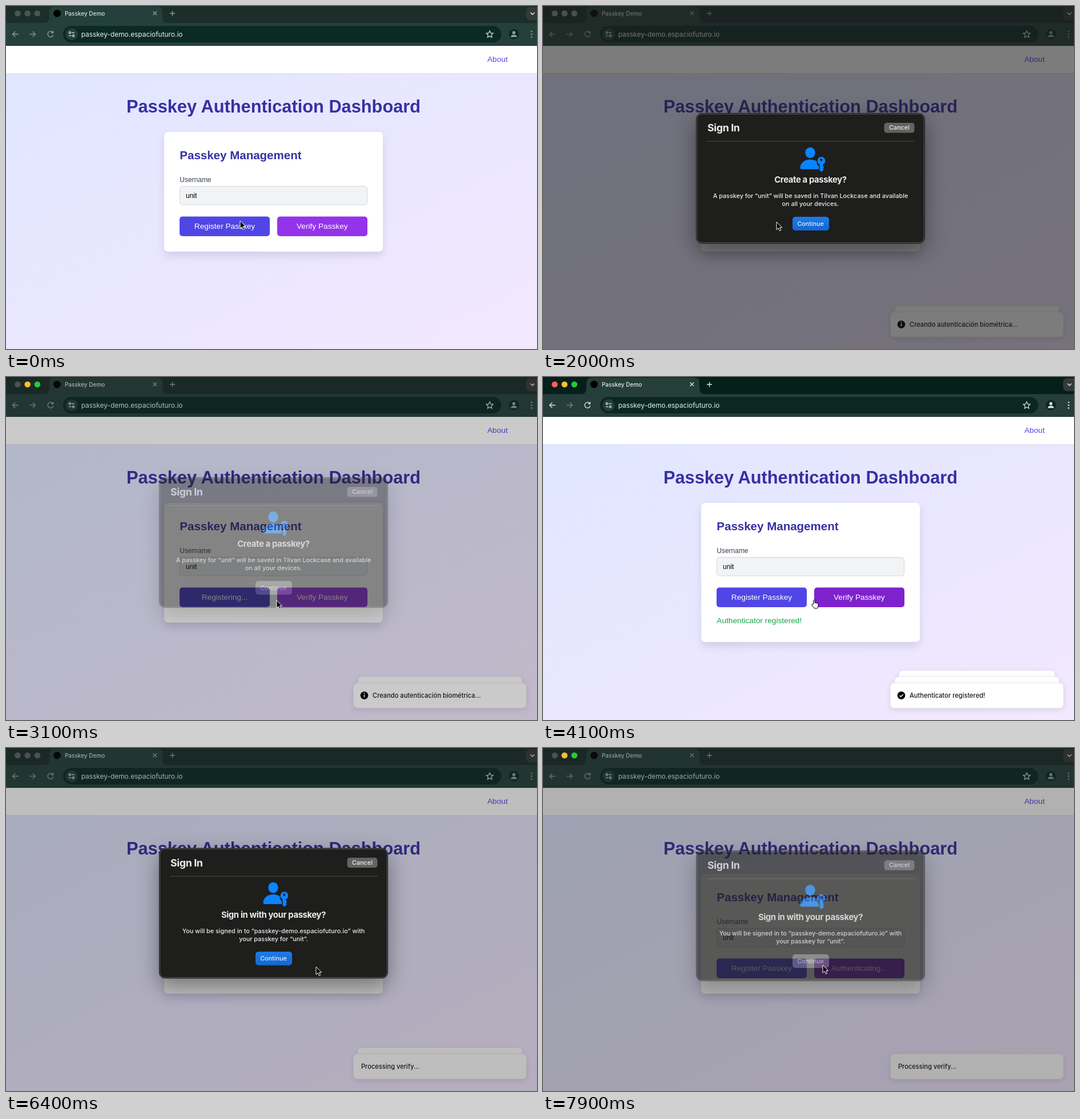
Write an HTML page that moves like this. It is 930 by 602 pixels and loops after 8000 ms.

```html
<!DOCTYPE html>
<html lang="en">
<head>
<meta charset="utf-8">
<title>Passkey Demo</title>
<style>
html, body { margin: 0; width: 100%; height: 100%; overflow: hidden; background: #fff; }
svg {
  display: block; width: 930px; height: 602px;
  font-family: "Liberation Sans", Arial, sans-serif; font-size: 13.68px;
  --strip: #051f1a; --bar: #253e39; --field: #0b2722; --icon: #dde6e4; --weak: #718681; --tab: #e6eeec;
}
svg.idle { --strip: #1b2e2a; --bar: #25403a; --field: #0b2a24; --icon: #90a29d; --weak: #80938e; --tab: #d5dedb; }
.ui { font-family: Inter, "Open Sans", sans-serif; font-weight: 500; }
.small { font-size: 10.8px; }
.mid { text-anchor: middle; }
.line { fill: none; stroke: var(--icon); stroke-width: 1.3; }
.card { fill: #fff; filter: drop-shadow(0 8px 7px rgba(40, 30, 90, .12)); }
.toast { fill: #fff; stroke: #ebebf0; filter: drop-shadow(0 3px 5px rgba(0, 0, 0, .1)); }
#sheet { filter: drop-shadow(0 12px 18px rgba(0, 0, 0, .4)); }
#sheet text { fill: #ededed; }
#sheet .head { font-weight: 700; letter-spacing: -.35px; }
</style>
</head>
<body>
<svg id="stage" viewBox="0 0 930 602">
  <defs>
    <linearGradient id="page" x2="1" y2="1">
      <stop stop-color="#e0e6ff"/><stop offset="1" stop-color="#f3e8ff"/>
    </linearGradient>
    <linearGradient id="blue" x2="0" y2="1">
      <stop stop-color="#1d7ce8"/><stop offset="1" stop-color="#1467d0"/>
    </linearGradient>
  </defs>

  <!-- Browser frame -->
  <rect width="930" height="70" fill="var(--strip)"/>
  <path fill="var(--bar)" d="M0 30H66Q76 30 76 20V10Q76 1 86 1H264Q274 1 274 10V20Q274 30 284 30H930V70H0Z"/>
  <circle cx="89.500" cy="13" r="6.500"/>
  <text class="ui" x="103" y="16.500" font-size="10" fill="var(--tab)">Passkey Demo</text>
  <path class="line" d="M257.500 9.500l6.500 6.500m0-6.500l-6.500 6.500M291.500 8.500v9m-4.500-4.500h9"/>
  <rect x="911" y="2" width="26" height="23" rx="7" fill="#353a39"/>
  <path d="M918.500 11.500l3.500 3.500 3.500-3.500" fill="none" stroke="#e6e6e6" stroke-width="1.500"/>
  <path class="line" d="M21.500 49.500H11.500m4.700-4.700l-4.700 4.700 4.700 4.700"/>
  <path class="line" style="stroke:var(--weak)" d="M41.500 49.500h10m-4.700-4.700l4.700 4.700-4.700 4.700"/>
  <path class="line" d="M82 46.500a4.900 4.900 0 1 0 .8 4M82.600 43.800v3.200h-3.400"/>
  <rect x="100" y="35" width="767.500" height="29" rx="14.500" fill="var(--field)"/>
  <circle cx="115" cy="49.500" r="10.500" fill="var(--bar)"/>
  <g fill="none" stroke="#dde6e4" stroke-width="1.200">
    <circle cx="111.800" cy="46.800" r="1.600"/><circle cx="118" cy="52.200" r="1.600"/>
    <path d="M115 46.800h5M110 52.200h4.700"/>
    <path d="M847.200 43.500l1.800 3.900 4.200.5-3.100 2.900.8 4.200-3.700-2.100-3.700 2.100.8-4.200-3.100-2.900 4.200-.5z"/>
  </g>
  <text class="ui" x="131.700" y="53.500" font-size="11.900" style="font-weight:400" fill="#e8efed">passkey-demo.espaciofuturo.io</text>
  <circle cx="889.500" cy="49.500" r="9" fill="var(--field)"/>
  <g fill="var(--icon)">
    <circle cx="889.500" cy="46.800" r="2.700"/><path d="M884.200 54.500q0-4 5.300-4t5.300 4z"/>
    <circle cx="920.500" cy="44.500" r="1.300"/><circle cx="920.500" cy="49.500" r="1.300"/><circle cx="920.500" cy="54.500" r="1.300"/>
  </g>

  <!-- Page -->
  <rect y="70" width="930" height="49" fill="#fff"/>
  <text x="843" y="98" fill="#4f46e5">About</text>
  <rect y="119" width="930" height="483" fill="url(#page)"/>
  <path d="M0 118.500H930" stroke="#d9dcea"/>
  <text class="mid" x="468.500" y="186.500" font-size="30.780" font-weight="700" fill="#3730a3">Passkey Authentication Dashboard</text>
  <rect id="card" class="card" x="277" y="221" width="383" height="210" rx="7"/>
  <text x="304.300" y="268.500" font-size="20.520" font-weight="700" fill="#3730a3">Passkey Management</text>
  <text x="304.300" y="308.500" font-size="11.970" fill="#374151">Username</text>
  <rect x="304.500" y="316.500" width="328" height="32.500" rx="5" fill="#f2f3f5" stroke="#d3d6dc"/>
  <text x="315" y="337" font-size="11.970">unit</text>
  <rect id="register" x="304" y="369.500" width="158" height="34.500" rx="5"/>
  <text id="registerLabel" class="mid" x="383" y="391" fill="#fff"></text>
  <rect id="verify" x="475" y="369.500" width="158" height="34.500" rx="5"/>
  <text id="verifyLabel" class="mid" x="553.800" y="391" fill="#fff"></text>
  <text id="status" x="304.300" y="431.500" fill="#16a34a">Authenticator registered!</text>
  <g id="toasts"></g>

  <rect id="dim" width="930" height="602" fill="#1d1d1d"/>
  <g id="lights">
    <circle cx="20.500" cy="13" r="5.300"/><circle cx="37.700" cy="13" r="5.300"/><circle cx="54.900" cy="13" r="5.300"/>
  </g>

  <!-- System sheet -->
  <g id="sheet">
    <rect x="268.500" y="188.500" width="400" height="228" rx="10" fill="#1e1e1d" stroke="#0a0a0a"/>
    <rect x="269.500" y="189.500" width="398" height="226" rx="9" fill="none" stroke="#62625f"/>
    <text class="ui head" x="288" y="220" font-size="17.800">Sign In</text>
    <rect x="597.500" y="205" width="53" height="17.500" rx="4.500" fill="#636362"/>
    <text class="ui small mid" x="624" y="217.300">Cancel</text>
    <path d="M287 237.500H651" stroke="#4b4b4a"/>
    <g fill="#0a84ff">
      <ellipse cx="468" cy="257.500" rx="8.700" ry="9.500"/>
      <path d="M450.500 283.500c0-8 8-14 17.500-14 5 0 9 1.300 11.500 3.300-.3 4 1 6.700 3.500 8.500v5.200H453q-2.500 0-2.500-3z"/>
      <path fill-rule="evenodd" d="M487.300 264.800a7 7 0 0 1 3 13.300v2.300l2 2.200-2 2.300 1.700 2-4.500 4.300-2.900-2.900v-10.200a7 7 0 0 1 2.700-13.300zm0 3.200a2.100 2.100 0 1 0 .01 0z"/>
    </g>
    <text id="question" class="ui head mid" x="468.500" y="310" font-size="14.800"></text>
    <text id="detail1" class="ui mid" x="468.500" y="337" font-size="10.800"></text>
    <text id="detail2" class="ui mid" x="468.500" y="351" font-size="10.800"></text>
    <rect id="continue" x="437" y="370" width="64" height="24" rx="5"/>
    <text class="ui small mid" x="468.500" y="385.700">Continue</text>
  </g>

  <g id="cursor" stroke-linejoin="round">
    <path id="arrow" d="M0 0V13.500L3.200 10.700 5.300 15.600 7.600 14.600 5.500 9.800H9.700Z" fill="#000" stroke="#fff"/>
    <path id="hand" transform="translate(-4 -1)" fill="#fff" stroke="#000"
      d="M3.500 8V1.600a1.200 1.200 0 0 1 2.400 0V5.600a1.100 1.100 0 0 1 2 .4 1.100 1.100 0 0 1 2 .5 1.100 1.100 0 0 1 2 .8V10.500q0 2-1.500 4.500H5Q3.500 12.500.7 9.300.3 7.800 1.800 7.600Z"/>
  </g>
</svg>

<script>
const LOOP = 8000, STEP = 100;
const el = id => document.getElementById(id);
const clamp = x => Math.min(1, Math.max(0, x));
const span = (t, start, length) => clamp((t - start) / length);
const easeOut = x => 1 - (1 - x) ** 3;
const smooth = x => x * x * (3 - 2 * x);
const within = (t, from, to) => t >= from && t < to;
const show = (node, visible) => { node.style.display = visible ? '' : 'none'; };

const toasts = [
  { start: 500, end: 4500, text: 'Processing registration...' },
  { start: 800, end: 4800, text: 'Creando autenticación biométrica...', icon: 'info' },
  { start: 3600, end: 7600, text: 'Authenticator registered!', icon: 'check' },
  { start: 5400, end: LOOP, text: 'Processing verify...' },
];

const sheets = [
  { open: 1600, pressed: 2700, close: 2800, question: 'Create a passkey?',
    detail: ['A passkey for “unit” will be saved in Tilvan Lockcase and available', 'on all your devices.'] },
  { open: 6200, pressed: 7700, close: 7700, question: 'Sign in with your passkey?',
    detail: ['You will be signed in to “passkey-demo.espaciofuturo.io” with', 'your passkey for “unit”.'] },
];
const OPENING = 400, CLOSING = 500;

// Cursor moves: start, duration, destination
const moves = [[100, 400, 409, 379], [2000, 500, 474, 392], [4600, 600, 543, 384], [6800, 600, 490, 381]];

const glyphs = {
  info: '<path d="M627.500 557.500v4.500" stroke="#fff" stroke-width="1.800"/><circle cx="627.500" cy="555" r="1" fill="#fff"/>',
  check: '<path d="M624.500 559l2.200 2.200 4-4.300" fill="none" stroke="#fff" stroke-width="1.500"/>',
};

el('toasts').innerHTML = toasts.map(({ text, icon }) => `<g>
  <rect class="toast" x="608.500" y="537" width="303" height="44" rx="7"/>
  <g>${icon ? `<circle cx="627.500" cy="558.800" r="6.900"/>${glyphs[icon]}` : ''}
  <text class="ui" font-size="11.100" x="${icon ? 642 : 622}" y="562.800" fill="#171717">${text}</text></g></g>`).join('');
const toastNodes = [...el('toasts').children];

function drawToasts(t) {
  toasts.forEach((toast, i) => {
    const enter = easeOut(span(t, toast.start, 400));
    const leave = easeOut(span(t, toast.end, 400));
    const depth = toasts.slice(i + 1).reduce((sum, next) => sum + easeOut(span(t, next.start, 400)), 0);
    const y = 559 - 12 * depth + 44 * (1 - enter) + 18 * leave;
    const node = toastNodes[i];
    node.setAttribute('transform', `translate(760 ${y}) scale(${1 - .05 * depth}) translate(-760 -559)`);
    node.style.opacity = enter * (1 - leave) * clamp(3 - depth);
    node.lastElementChild.style.opacity = clamp(1 - depth);
  });
}

function drawSheet(t) {
  const sheet = sheets.find(s => t > s.open && t < s.close + CLOSING);
  show(el('sheet'), sheet);
  show(el('dim'), sheet);
  if (!sheet) return false;
  const opening = span(t, sheet.open, OPENING);
  const closing = span(t, sheet.close, CLOSING);
  el('dim').style.opacity = .575 * opening * (1 - closing);
  el('sheet').style.opacity = Math.min(1, opening * 2) * (1 - closing);
  el('sheet').setAttribute('transform', `translate(0 ${-25 * (1 - opening) - 20 * closing})`);
  el('question').textContent = sheet.question;
  el('detail1').textContent = sheet.detail[0];
  el('detail2').textContent = sheet.detail[1];
  el('continue').setAttribute('fill', t >= sheet.pressed ? '#747476' : 'url(#blue)');
  return closing > 0;
}

function drawCursor(t) {
  let x = 410, y = 377;
  for (const [start, length, toX, toY] of moves) {
    const p = smooth(span(t, start, length));
    x += (toX - x) * p;
    y += (toY - y) * p;
  }
  const pointing = within(t, 3500, 5400);
  show(el('hand'), pointing);
  show(el('arrow'), !pointing);
  el('cursor').setAttribute('transform', `translate(${x} ${y})`);
}

function drawPage(t, sheetClosing) {
  const active = within(t, 100, 1700) || within(t, 3500, 6300);
  const registering = within(t, 400, 3600);
  const registered = within(t, 3600, 5400);
  const verifying = t >= 5400;
  el('stage').classList.toggle('idle', !active);
  ['#fe5f57', '#febc2e', '#28c840'].forEach((color, i) => {
    const lit = active || (sheetClosing && i > 0);
    el('lights').children[i].setAttribute('fill', lit ? color : 'rgba(255,255,255,.2)');
  });
  el('register').setAttribute('fill', within(t, 100, 3500) ? '#4338ca' : '#4f46e5');
  el('verify').setAttribute('fill', t >= 3500 ? '#7e22ce' : '#9333ea');
  el('registerLabel').textContent = registering ? 'Registering...' : 'Register Passkey';
  el('verifyLabel').textContent = verifying ? 'Authenticating...' : 'Verify Passkey';
  el('card').setAttribute('height', registered ? 244 : 210);
  show(el('status'), registered);
}

function frame() {
  const t = Math.floor(performance.now() % LOOP / STEP) * STEP;
  drawToasts(t);
  drawPage(t, drawSheet(t));
  drawCursor(t);
  requestAnimationFrame(frame);
}
frame();
</script>
</body>
</html>
```
